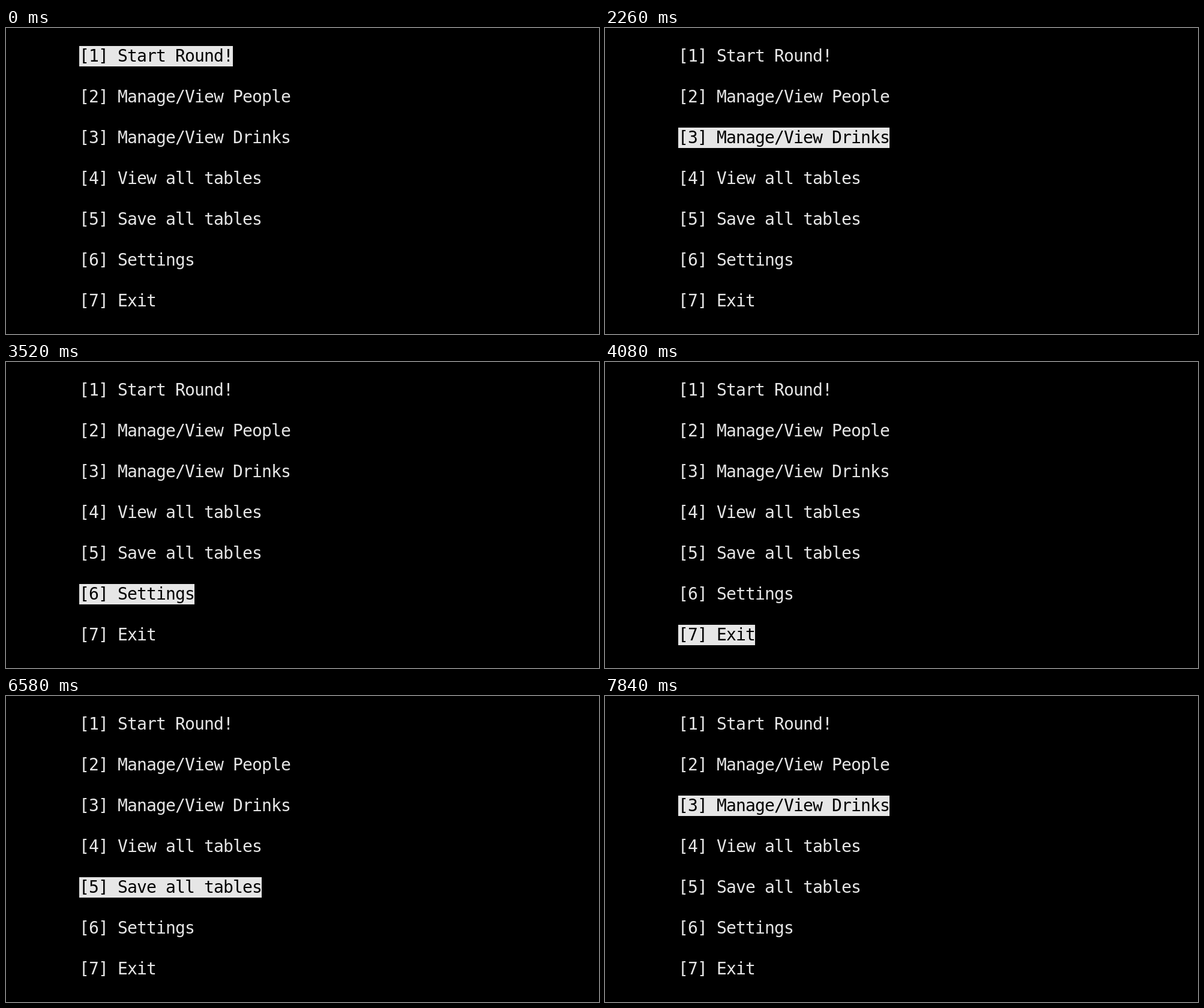
An HTML page for the animation above (8 s loop, 988x510 px).

```html
<!DOCTYPE html>
<html lang="en">
<head>
<meta charset="utf-8">
<title>Terminal menu</title>
<style>
  @property --row {
    syntax: "<integer>";
    inherits: false;
    initial-value: 0;
  }

  html, body {
    width: 100%;
    height: 100%;
    margin: 0;
    overflow: hidden;
    background: #000;
  }

  .menu {
    --pitch: 68px;
    position: absolute;
    left: 122px;
    top: 30px;
    height: calc(7 * var(--pitch));
    margin: 0;
    padding: 0;
    list-style: none;
    color: #e6e6e6;
    font: 28px/34px "DejaVu Sans Mono", monospace;
    letter-spacing: calc(16px - 1ch); /* 16px terminal cells */
    white-space: nowrap;
  }

  .menu li {
    width: max-content;
    height: 34px;
    margin-bottom: 34px;
  }

  /* Inverted copy of the menu, with only the selected row visible */
  .selected {
    color: #000;
    clip-path: inset(calc(var(--row) * var(--pitch)) 0 calc((6 - var(--row)) * var(--pitch)) 0);
    animation: select 8s step-end infinite;
  }

  .selected li { background: #e6e6e6; }

  @keyframes select {
    0%     { --row: 0; }
    15.75% { --row: 1; }
    28.25% { --row: 2; }
    29.75% { --row: 3; }
    36.75% { --row: 4; }
    44%    { --row: 5; }
    51%    { --row: 6; }
    73.5%  { --row: 5; }
    82.25% { --row: 4; }
    89.5%  { --row: 3; }
    98%, 100% { --row: 2; }
  }
</style>
</head>
<body>
<ul class="menu">
  <li>[1] Start Round!</li>
  <li>[2] Manage/View People</li>
  <li>[3] Manage/View Drinks</li>
  <li>[4] View all tables</li>
  <li>[5] Save all tables</li>
  <li>[6] Settings</li>
  <li>[7] Exit</li>
</ul>
<script>
  const selected = document.querySelector(".menu").cloneNode(true);
  selected.classList.add("selected");
  selected.setAttribute("aria-hidden", "true");
  document.body.append(selected);
</script>
</body>
</html>
```
